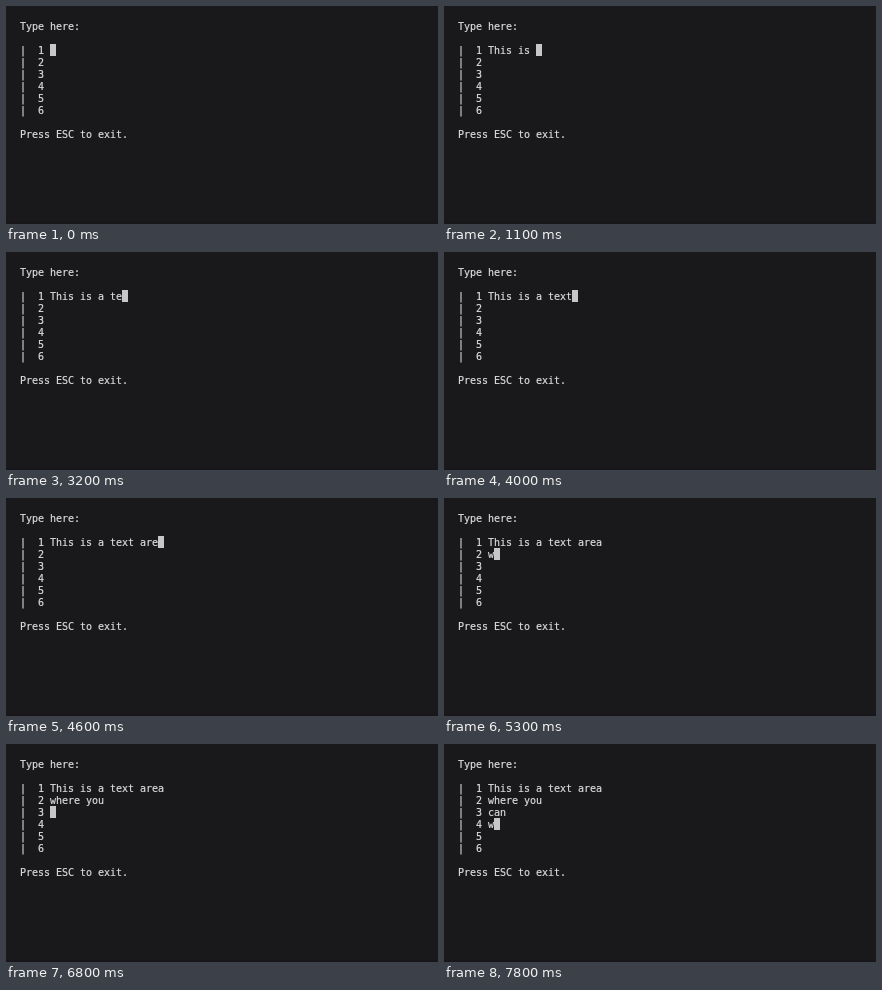
Write an HTML page that moves like this. It is 432 by 218 pixels and loops after 8 s.

```html
<!DOCTYPE html>
<html lang="en">
<head>
<meta charset="utf-8">
<title>Text area</title>
<style>
  html, body { margin: 0; width: 100%; height: 100%; overflow: hidden; background: #19191b; }
  #stage { position: relative; width: 432px; height: 218px; overflow: hidden; background: #19191b; }
  #stage::after { content: ""; position: absolute; left: 0; right: 0; bottom: 0; height: 2px; background: #18161a; }
  #screen {
    position: absolute; left: 14px; top: 15px; margin: 0;
    font: 10px/12px "DejaVu Sans Mono", "Liberation Mono", monospace;
    letter-spacing: -0.02px; color: #dcdcdc; font-variant-ligatures: none;
    -webkit-text-stroke: 0.2px #dcdcdc;
  }
  #cursor { position: absolute; width: 6px; height: 12px; background: #c7c7c7; }
</style>
</head>
<body>
<div id="stage">
  <pre id="screen"></pre>
  <div id="cursor"></div>
</div>
<script>
const LOOP = 8000, CELL = 6, ROW = 12, LEFT = 44, TOP = 38, LINES = 6;

// [time in ms, keys typed]; "<" is backspace
const keys = [
  [300, "T"], [500, "hi"], [600, "s"], [800, " i"], [1000, "s"], [1100, " "],
  [1700, "a"], [1800, " "], [2400, "t"], [2600, "e"], [2700, "s"],
  [3200, "<"], [3700, "x"], [4000, "t"], [4100, " "], [4300, "a"],
  ...burst(4500, "rea"), [4900, "\n"],
  ...burst(5300, "where "), ...burst(6000, "you "), [6800, "\n"],
  ...burst(7000, "can"), [7600, "\n"], [7800, "w"]
];

function burst(start, text) {
  return [...text].map((ch, i) => [start + i * 100, ch]);
}

function typedAt(time) {
  let text = "";
  for (const [at, input] of keys) {
    if (at > time) break;
    text = input === "<" ? text.slice(0, -1) : text + input;
  }
  return text.split("\n");
}

const screen = document.getElementById("screen");
const cursor = document.getElementById("cursor");
const begin = performance.now();

function draw(now) {
  const lines = typedAt(Math.max(0, now - begin) % LOOP);
  const area = Array.from({ length: LINES }, (_, i) => `|  ${i + 1} ${lines[i] || ""}`);
  const text = ["Type here:", "", ...area, "", "Press ESC to exit."].join("\n");
  if (screen.textContent !== text) screen.textContent = text;
  const row = lines.length - 1;
  cursor.style.left = LEFT + lines[row].length * CELL + "px";
  cursor.style.top = TOP + row * ROW + "px";
  requestAnimationFrame(draw);
}
draw(begin);
</script>
</body>
</html>
```
